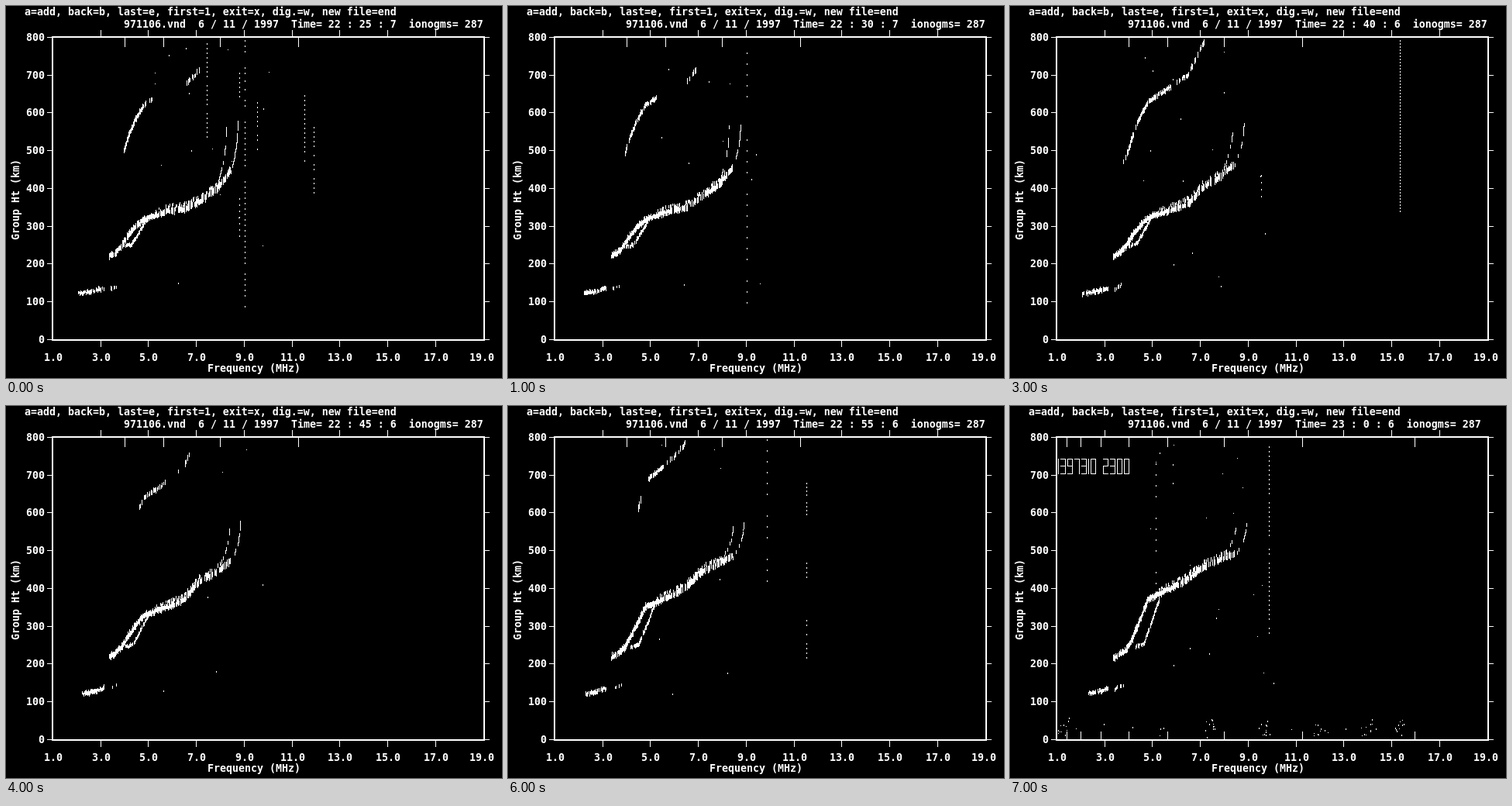
Write an HTML page that moves like this. It is 640 px wide and 480 px high and loops after 8 s.

```html
<!DOCTYPE html>
<html lang="en">
<head>
<meta charset="utf-8">
<title>Ionogram sequence</title>
<style>
html, body { margin: 0; width: 640px; height: 480px; overflow: hidden; background: #000; }
svg { display: block; }
text { font: bold 13.29px "DejaVu Sans Mono", monospace; fill: #fff; white-space: pre; }
path { fill: #fff; shape-rendering: crispEdges; }
</style>
</head>
<body>
<svg width="640" height="480" viewBox="0 0 640 480">
  <rect width="640" height="480"/>
  <path id="axes"/>
  <path id="echo"/>
  <g id="labels"></g>
  <text x="24" y="12">a=add, back=b, last=e, first=1, exit=x, dig.=w, new file=end</text>
  <text id="head" x="152" y="28"></text>
  <text x="260" y="472">Frequency (MHz)</text>
  <text transform="translate(17 302) rotate(-90)">Group Ht (km)</text>
</svg>
<script>
const GROUND = 430, TOP = 42;
const $ = id => document.getElementById(id);
const mix = (a, b, t) => a + (b - a) * t;
const clamp = (v, lo, hi) => Math.min(hi, Math.max(lo, v));
const box = (x, y, w, h) => `M${x} ${y}h${w}v${h}h${-w}z`;

function drawAxes() {
  let d = box(59, 39, 559, 2) + box(59, GROUND, 559, 2) + box(59, 39, 2, 393) + box(616, 39, 2, 393);
  let labels = '';
  const label = (x, y, s) => { labels += `<text x="${x}" y="${y}">${s}</text>`; };
  for (let i = 0; i <= 8; i++) {
    const y = Math.floor(GROUND - i * 48.75 + 0.49), s = String(i * 100);
    d += box(53, y, 7, 1) + box(618, y, 6, 1);
    label(50 - s.length * 8, y + 5, s);
  }
  for (let i = 0; i <= 9; i++) {
    const x = Math.round(60 + i * 61.7), s = 1 + 2 * i + '.0';
    if (i % 9) d += box(x, 432, 1, 8) + box(x, 31, 1, 8);
    label(Math.min(598, x + 1 - s.length * 4), 458, s);
  }
  $('axes').setAttribute('d', d);
  $('labels').innerHTML = labels;
}

let out, seed;
function rnd() {
  seed = (seed * 1664525 + 1013904223) >>> 0;
  return seed / 4294967296;
}

function mark(x, y, h) {
  x = Math.round(x);
  y = Math.round(y);
  if (y > TOP && y + h <= GROUND) out += box(x, y, 1, h);
}

// Ragged echo along y = f(x): columns of height about h, each kept with chance p.
function trace(f, x0, x1, h, p) {
  for (let x = Math.round(x0); x < x1; x++) {
    if (rnd() > p) continue;
    const a = f(x), b = f(x + 1);
    const tall = Math.round(Math.abs(b - a) + h * (0.55 + rnd() * 0.6));
    mark(x, (a + b - tall) / 2 + rnd() * 3 - 1.5, tall);
  }
}

// Dashes that climb from (x0, y0) and turn vertical at x1.
function cusp(x0, y0, x1, top, p) {
  for (let y = y0; y > top; y -= 4) {
    const s = (y0 - y) / (y0 - top);
    if (rnd() < p) mark(mix(x1, x0, (1 - s) ** 2), y, 5);
  }
}

function column(x, y0, y1, step = 6, p = 0.8) {
  for (let y = y0; y <= y1; y += step) if (rnd() < p) mark(x, y, 2);
}

function specks(n, x, y, w, h) {
  while (n--) mark(x + rnd() * w, y + rnd() * h, rnd() < 0.6 ? 2 : 1);
}

// The F layer at u = 0 and u = 1; its low side rises late, its high side steadily.
const KEY_X = [132, 141, 150, 158, 166, 178, 212, 230, 250, 272, 290];
const EARLY = [323, 319, 309, 296, 286, 275, 264, 262, 252, 237, 212];
const LATE = [327, 320, 315, 300, 281, 250, 233, 223, 208, 198, 191];

function layer(u) {
  const ys = KEY_X.map((x, i) => mix(EARLY[i], LATE[i], u ** clamp(3 - (x - 212) / 19, 1, 3)));
  return x => {
    let i = 0;
    while (i < KEY_X.length - 2 && x > KEY_X[i + 1]) i++;
    return mix(ys[i], ys[i + 1], (x - KEY_X[i]) / (KEY_X[i + 1] - KEY_X[i]));
  };
}

function drawEcho(u, e0, hops) {
  const late = u ** 3, f = layer(u);

  trace(x => 371 - 7 * clamp((x - e0) / (127 - e0), 0, 1) ** 1.5, e0, 127, 6, 0.92);
  trace(x => 365 - (x - 135) / 2, 135, 143 + late * 6, 5, 0.65);

  trace(f, 133, 212, 8, 0.98);
  trace(f, 212, 290, 9, 0.75);
  trace(x => f(x) - 6, 192, 280, 5, 0.4);

  const foot = 152 + 10 * late, join = 180 + 14 * late, end = f(join) + 4;
  trace(x => 311 - (x - foot) * 0.35, foot, foot + 11, 5, 0.85);
  trace(x => mix(307, end, (x - foot - 11) / (join - foot - 11)), foot + 11, join, 4, 0.9);

  cusp(272, f(272) - 5, 284 + 7 * u, 154, 0.65);
  cusp(290, f(290), 299 + 6 * u, 147, 0.7);

  // Second reflection: nearly twice the height.
  const twice = x => GROUND - 1.95 * (GROUND - f(x));
  for (const [x0, x1, p] of hops) trace(twice, x0, x1, 6, p);
}

// Band limits lie half an octave apart.
function drawBands(first, last, both) {
  for (let n = first; n <= last; n++) {
    const x = Math.round(60.3 + 30.75 * (2 ** (n / 2) - 1));
    out += box(x, 41, 1, 12);
    if (both) out += box(x, 420, 1, 10);
  }
}

const SEGMENTS = {
  a: [0, 0, 7, 1], b: [6, 0, 1, 10], c: [6, 10, 1, 10], d: [0, 19, 7, 1],
  e: [0, 10, 1, 10], f: [0, 0, 1, 10], g: [0, 9, 7, 1]
};
const DIGITS = { 0: 'abcdef', 1: 'bc', 2: 'abdeg', 3: 'abcdg', 7: 'abc', 9: 'abcdfg' };

function drawStamp(text, x, y) {
  for (const c of text) {
    if (c === '1') x -= 6;
    for (const s of DIGITS[c] || '') {
      const [dx, dy, w, h] = SEGMENTS[s];
      out += box(x + dx, y + dy, w, h);
    }
    x += c === ' ' ? 7 : 9;
  }
}

// e0: start of the E layer; hops: visible parts of the second reflection.
const scenes = [
  { e0: 93, hops: [[152, 178, 1], [178, 190, .6], [228, 250, .45]], stray: 18,
    columns: [[259, 48, 172], [301, 86, 118], [301, 248, 300, 8], [308, 44, 394, 7],
      [324, 124, 186], [385, 115, 215], [397, 156, 244]] },
  { e0: 98, hops: [[151, 192, .85], [228, 248, .3]], stray: 10, columns: [[308, 60, 392, 14]] },
  { e0: 106, hops: [[151, 174, .2], [174, 195, .95]], stray: 16,
    columns: [[424, 50, 92, 4], [424, 156, 190, 4], [263, 203, 236], [241, 269, 350]] },
  { e0: 93, hops: [[146, 160, .4], [162, 208, .95], [214, 252, .6]], stray: 16,
    columns: [[503, 44, 266, 4, 1], [324, 218, 248, 9]] },
  { e0: 98, hops: [[168, 206, .65], [222, 238, .3]], stray: 6, columns: [] },
  { e0: 107, hops: [[172, 206, .5], [224, 232, .4]], stray: 6, columns: [[305, 108, 116]] },
  { e0: 100, hops: [[168, 172, .5], [181, 201, .95], [204, 232, .4]], stray: 8,
    columns: [[334, 43, 236, 14], [385, 94, 147, 5], [385, 202, 225], [385, 276, 326]] },
  { e0: 101, hops: [], stray: 20, stamp: '1397310 2300',
    columns: [[334, 52, 298, 6, .9], [188, 74, 232, 14], [210, 75, 102, 12]] }
];

function build(scene, k) {
  out = '';
  seed = 97 + k * 7919;
  const { e0, hops, stray, columns, stamp } = scene;
  drawEcho(k / (scenes.length - 1), e0, hops);
  for (const c of columns) column(...c);
  specks(stray, 170, 45, 170, 330);
  drawBands(stamp ? 1 : 4, stamp ? 8 : 7, stamp);
  if (stamp) {
    drawStamp(stamp, 62, 68);
    for (const x of [62, 249, 320, 390, 452, 497]) specks(10, x, 404, 16, 22);
    specks(14, 70, 400, 480, 28);
  }
  const minute = 25 + 5 * k;
  const time = [22 + Math.floor(minute / 60), minute % 60, k < 2 ? 7 : 6].join(' : ');
  return { d: out, head: `971106.vnd  6 / 11 / 1997  Time= ${time}  ionogms= 287` };
}

const frames = scenes.map(build);
let shown = -1;
function show(ms) {
  const i = Math.floor(ms / 1000) % frames.length;
  if (i === shown) return;
  shown = i;
  $('echo').setAttribute('d', frames[i].d);
  $('head').textContent = frames[i].head;
}

drawAxes();
const start = performance.now();
function tick() {
  show(performance.now() - start);
  requestAnimationFrame(tick);
}
tick();
</script>
</body>
</html>
```
